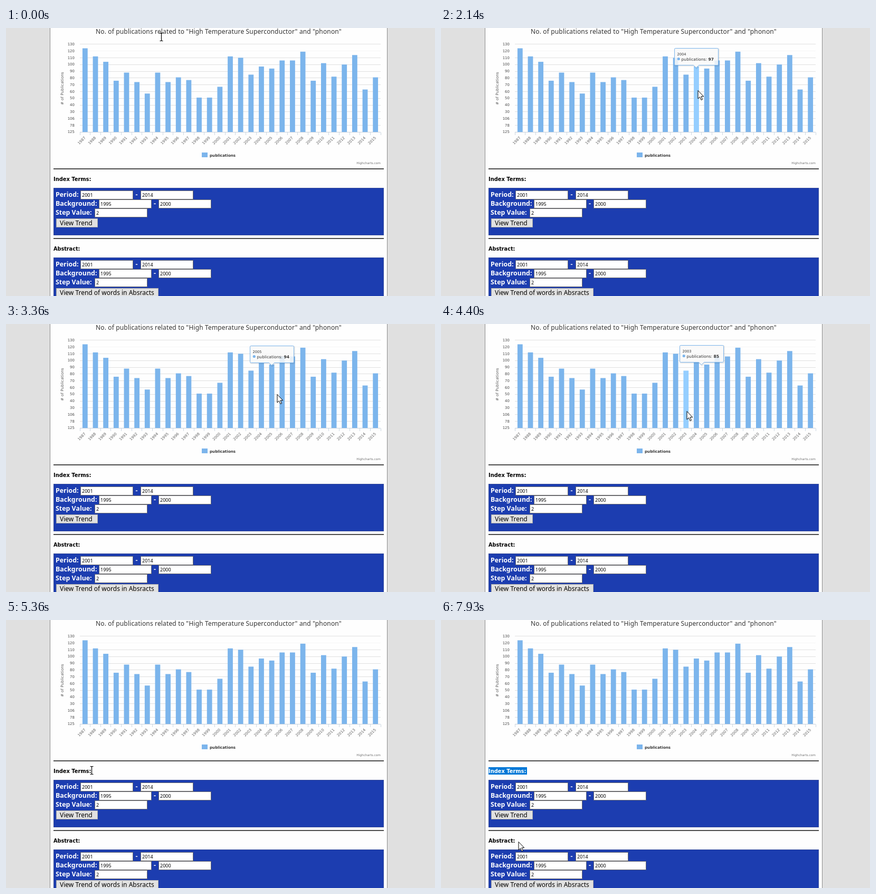
Animation of 813x508 px, one loop 8000 ms. Source, as an HTML page:

```html
<!DOCTYPE html>
<html lang="en">
<head>
<meta charset="utf-8">
<title>Publication trends</title>
<style>
html, body { margin: 0; width: 100%; height: 100%; overflow: hidden; background: #e0e0e0; }
svg { display: block; font-family: "DejaVu Sans", sans-serif; }
text { white-space: pre; }
.ui { font-family: "Noto Sans", sans-serif; }
.bold { font-weight: bold; }
.end { text-anchor: end; }
.mid { text-anchor: middle; }
</style>
</head>
<body>
<svg id="stage" width="813" height="508" viewBox="0 0 813 508"></svg>
<script>
(() => {
const LOOP = 8000, TICK = 120;
const LEFT = 140, BASE = 197.2, UNIT = 1.28, SLOT = 570 / 29;
const BLUE = '#7cb5ec', HOVER = '#95ceff';
const DRAG = 5850, RELEASE = 7180;
const counts = [124, 112, 104, 76, 88, 74, 57, 88, 74, 81, 77, 51, 51, 67, 112,
  110, 85, 97, 94, 106, 106, 119, 76, 102, 82, 100, 114, 63, 81];

// Pointer legs: start time, number of ticks, destination
const legs = [
  [150, 7, 460, 70], [1020, 1, 463, 92], [1140, 3, 467, 101],
  [1630, 2, 481, 112], [1870, 3, 487, 118], [2390, 5, 508, 128],
  [3240, 2, 514, 133], [3510, 4, 527, 138], [4400, 2, 405, 192],
  [4640, 2, 267, 307], [4880, 2, 95, 381], [5120, 1, 142, 306],
  [5240, 2, 162, 285], [5480, 2, 174, 287], [DRAG, 7, 97, 290],
  [6690, 2, 90, 291], [RELEASE, 6, 152, 414], [7930, 1, 147, 420]
];

const stage = document.getElementById('stage');

function set(node, attrs) {
  for (const key in attrs) node.setAttribute(key, attrs[key]);
  return node;
}
function add(tag, attrs, parent = stage) {
  return parent.appendChild(set(document.createElementNS('http://www.w3.org/2000/svg', tag), attrs));
}
function rect(x, y, width, height, fill, extra) {
  return add('rect', { x, y, width, height, fill, ...extra });
}
function path(d, stroke, extra, parent) {
  return add('path', { d, stroke, fill: 'none', ...extra }, parent);
}
function text(str, x, y, size, fill, extra, parent) {
  const node = add('text', { x, y, 'font-size': size, fill, ...extra }, parent);
  node.textContent = str;
  return node;
}
const center = i => LEFT + SLOT * (i + 0.5);
const barTop = i => BASE - counts[i] * UNIT;

function drawPage() {
  rect(0, 0, 813, 508, '#e0e0e0');
  rect(83, -2, 640, 512, '#fefefe');
  path('M83.5 0V508M722.5 0V508', '#8c8c8c');
  for (const y of [267, 399]) path(`M90 ${y}H716`, '#4c4c4c', { 'stroke-width': 2 });
}

function drawChart() {
  text('No. of publications related to "High Temperature Superconductor" and "phonon"',
    170, 11, 12, '#333', { class: 'ui', 'letter-spacing': 0.15 });
  for (let i = 0; i < 14; i++) {
    const y = 30.8 + i * 12.8;
    const label = i < 11 ? 130 - 10 * i : [106, 78, 125][i - 11];
    if (i < 13) path(`M${LEFT} ${Math.floor(y) + 0.5}H710`, i === 1 ? '#f6f6f6' : '#e0e0e0');
    text(label, 130, y + 2.2, 7, '#484848', { class: 'end' });
  }
  text('# of Publications', 0, 0, 7.4, '#606060',
    { class: 'mid', transform: 'translate(109 114.5) rotate(-90)' });

  const bars = counts.map((n, i) =>
    rect(center(i) - 4.9, barTop(i), 9.8, BASE + 0.3 - barTop(i), BLUE));
  path(`M${LEFT} 197.5H710`, '#c8d3de');
  for (let i = 0; i <= 29; i++) path(`M${Math.floor(LEFT + SLOT * i) + 0.5} 198V203`, '#ccd6e0');
  counts.forEach((n, i) => text(1987 + i, 0, 0, 7, '#606060',
    { class: 'end', transform: `translate(${center(i) + 1.5} 208.7) rotate(-45)` }));

  rect(371, 236, 11, 9, BLUE);
  text('publications', 386, 244, 7.1, '#333', { class: 'bold' });
  text('Highcharts.com', 710, 258, 5.8, '#707070', { class: 'end' });
  return bars;
}

function drawField(x, y, value) {
  rect(x + 0.5, y + 0.5, 99, 16, '#fff', { stroke: '#6c6c70' });
  text(value, x + 3, y + 12.2, 9, '#000', { class: 'ui' });
}

function drawForm(dy, button, width) {
  rect(90.5, 303.5 + dy, 625, 89, '#1c3db0', { stroke: '#34499a' });
  const label = (str, x, y) => text(str, x, y + dy, 12.4, '#fff', { class: 'ui bold' });
  label('Period:', 94, 320);
  label('-', 245.5, 320);
  label('Background:', 94, 337);
  label('-', 280, 337);
  label('Step Value:', 94, 354);
  drawField(141, 308 + dy, 2001);
  drawField(255, 308 + dy, 2014);
  drawField(176, 325 + dy, 1995);
  drawField(289, 325 + dy, 2000);
  drawField(168, 342 + dy, 2);
  rect(95.5, 361.5 + dy, width, 16, '#e1e1e1', { stroke: '#a8a8a8' });
  text(button, 102, 374 + dy, 12, '#000', { class: 'ui' });
}

function drawHeadings() {
  const heading = (str, y, fill, extra) => text(str, 90, y, 9.9, fill, { class: 'bold', ...extra });
  heading('Index Terms:', 290, '#000');
  heading('Abstract:', 422, '#000', { 'font-size': 9.7 });
  const area = { y: 279, height: 14 };
  const mark = add('rect', { ...area, fill: '#0078d7' });
  const clip = add('rect', area, add('clipPath', { id: 'selected' }));
  heading('Index Terms:', 290, '#fff', { 'clip-path': 'url(#selected)' });
  return [mark, clip];
}

function drawTooltip() {
  const group = add('g', {});
  const d = 'M2 0H81Q83 0 83 2V30Q83 32 81 32H46L41 37L36 32H2Q0 32 0 30V2Q0 0 2 0Z';
  path(d, '#000', { 'stroke-width': 3, opacity: 0.08, transform: 'translate(1 1)' }, group);
  path(d, BLUE, { fill: '#f9f9f9', 'fill-opacity': 0.85 }, group);
  const year = text('', 5, 13, 6.7, '#333', {}, group);
  add('circle', { cx: 7.8, cy: 20, r: 2.6, fill: BLUE }, group);
  const line = text('publications: ', 13, 23, 7.6, '#333', {}, group);
  const value = add('tspan', { class: 'bold' }, line);
  return { group, year, value };
}

// Walks the pointer tick by tick; hover, tooltip and selection follow from it
function simulate() {
  let state = { t: 0, x: 294, y: 17, hover: -1, point: -1, tipX: 0, tipY: 0, seen: 0, alpha: 0, from: 163 };
  const states = [state];
  for (const [start, ticks, toX, toY] of legs) {
    const { x, y } = state;
    for (let k = 1; k <= ticks; k++) {
      state = { ...state, t: start + (k - 1) * TICK };
      state.x = x + (toX - x) * k / ticks;
      state.y = y + (toY - y) * k / ticks;
      state.hover = counts.findIndex((n, i) =>
        Math.abs(state.x - center(i)) < 5 && state.y > barTop(i) && state.y < BASE);
      moveTip(state);
      if (state.t >= DRAG) state.from = Math.max(90, Math.min(state.from, state.x));
      states.push(state);
    }
  }
  return states;
}

// The tooltip halves its distance to the last hovered bar, then fades out
function moveTip(s) {
  const ease = s.point < 0 ? 1 : 0.5;
  if (s.hover >= 0) {
    s.point = s.hover;
    s.seen = s.t;
  }
  if (s.point < 0) return;
  s.tipX += (center(s.point) - 40.5 - s.tipX) * ease;
  s.tipY += (barTop(s.point) - 35.3 - s.tipY) * ease;
  s.alpha = Math.max(0, Math.min(1, (840 - (s.t - s.seen)) / 240));
}

drawPage();
const bars = drawChart();
drawForm(0, 'View Trend', 78);
drawForm(132, 'View Trend of words in Absracts', 193);
const selection = drawHeadings();
const tooltip = drawTooltip();
const arrow = path('M.5 .5V16L4 12.7L6.6 18.5L9 17.5L6.5 11.8H11.3Z', '#000', { fill: '#fff' });
const beam = path('M-3 -7.5H-1L0 -6.5L1 -7.5H3M0 -6.5V6.5M-3 7.5H-1L0 6.5L1 7.5H3', '#000',
  { 'stroke-width': 1.2 });
const states = simulate();

function render(t) {
  const s = states.filter(state => state.t <= t).pop();
  const x = Math.round(s.x), y = Math.round(s.y);
  const isBeam = t < 150 || (t >= 5360 && t < RELEASE);
  set(arrow, { transform: `translate(${x - 0.5} ${y})`, opacity: isBeam ? 0 : 1 });
  set(beam, { transform: `translate(${x + 0.5} ${y})`, opacity: isBeam ? 1 : 0 });

  bars.forEach((bar, i) => set(bar, { fill: i === s.hover ? HOVER : BLUE }));

  set(tooltip.group, {
    opacity: s.alpha,
    transform: `translate(${Math.floor(s.tipX) + 0.5} ${Math.floor(s.tipY) + 0.5})`
  });
  if (s.point >= 0) {
    tooltip.year.textContent = 1987 + s.point;
    tooltip.value.textContent = counts[s.point];
  }

  for (const part of selection) set(part, { x: s.from, width: 163 - s.from });
}

const begin = performance.now();
function frame() {
  render((performance.now() - begin) % LOOP);
  requestAnimationFrame(frame);
}
frame();
})();
</script>
</body>
</html>
```
